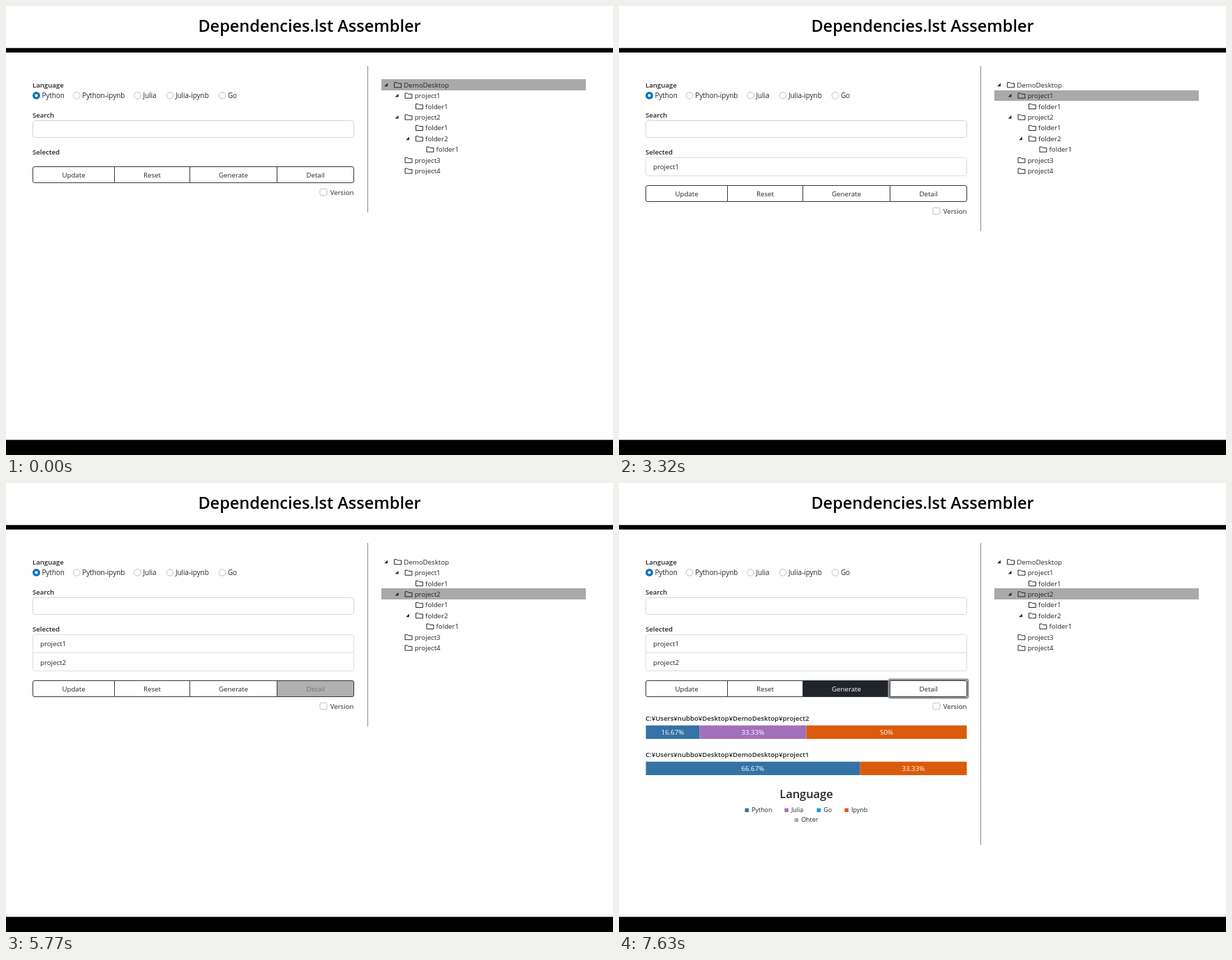
Recreate the animation shown at these times as an HTML page. Size 870x644 px, loop 8 s.

```html
<!DOCTYPE html>
<html lang="en">
<head>
<meta charset="utf-8">
<title>Dependencies.lst Assembler</title>
<style>
html, body { margin: 0; width: 100%; height: 100%; overflow: hidden; background: #fff; }
svg { display: block; width: 870px; height: 644px; }
text { font: 400 9.7px "Open Sans", "Noto Sans", sans-serif; fill: #212529; white-space: pre; }
text.label { font-weight: 600; font-size: 9.6px; }
text.title { font-weight: 600; font-size: 23.5px; fill: #000; }
text.head { font-weight: 600; font-size: 16.4px; }
text.radio { font-size: 9.9px; }
text.key { font-size: 8.9px; }
text.light { fill: #fff; }
</style>
</head>
<body>
<svg id="stage" viewBox="0 0 870 644"></svg>
<script>
const LOOP = 8000;
const NS = "http://www.w3.org/2000/svg";
const stage = document.getElementById("stage");

function add(parent, tag, attrs) {
  const el = document.createElementNS(NS, tag);
  for (const k in attrs) el.setAttribute(k, attrs[k]);
  parent.appendChild(el);
  return el;
}
function rect(parent, x, y, width, height, fill, more) {
  return add(parent, "rect", { x, y, width, height, fill, ...more });
}
function label(parent, x, y, str, cls = "", anchor = "start") {
  const el = add(parent, "text", { x, y, class: cls, "text-anchor": anchor });
  el.textContent = str;
  return el;
}
const group = parent => add(parent, "g", {});
const show = (el, on) => el.setAttribute("visibility", on ? "visible" : "hidden");

// Linear interpolation through [time, value] pairs
function track(keys, t) {
  if (!keys || t <= keys[0][0]) return keys ? keys[0][1] : 0;
  for (let i = 1; i < keys.length; i++) {
    const [t0, a] = keys[i - 1], [t1, b] = keys[i];
    if (t < t1) return a + (b - a) * (t - t0) / (t1 - t0);
  }
  return keys[keys.length - 1][1];
}
function mix(a, b, p) {
  return `rgb(${a.map((v, i) => Math.round(v + (b[i] - v) * p)).join()})`;
}
const WHITE = [255, 255, 255], DARK = [33, 37, 41], HOVER = [211, 211, 211];

// Page frame
label(stage, 435, 37, "Dependencies.lst Assembler", "title", "middle");
rect(stage, 0, 60.3, 870, 6.4, "#000");
rect(stage, 0, 622.3, 870, 21.7, "#000");
const divider = rect(stage, 518, 86, 1, 210, "#8c8c8c");

// Language choice and search
label(stage, 38, 116.7, "Language", "label");
[[43.5, "Python"], [101.3, "Python-ipynb"], [188.5, "Julia"], [235, "Julia-ipynb"], [310, "Go"]]
  .forEach(([x, name], i) => {
    const ring = i ? { r: 4.8, stroke: "#bfbfbf", "stroke-width": 1 }
                   : { r: 3.8, stroke: "#0270c0", "stroke-width": 3.2 };
    add(stage, "circle", { cx: x, cy: 128.4, fill: "#fff", ...ring });
    label(stage, x + 7.9, 132, name, "radio");
  });
label(stage, 38, 160.4, "Search", "label");
rect(stage, 38.5, 164.5, 460, 24, "#fff", { rx: 3, stroke: "#d3d6d9" });

// Selected items
label(stage, 38, 212.8, "Selected", "label");
const picked = group(stage);
const pickedBox = rect(picked, 38.5, 217.5, 460, 26, "#fff", { rx: 3, stroke: "#dedede" });
label(picked, 49, 234, "project1");
const second = group(picked);
rect(second, 38.5, 243, 460, 1, "#dedede");
label(second, 49, 260.6, "project2");

// Button row; moves down as the list grows
const actions = group(stage);
const edges = [38.5, 155.5, 263.5, 388.5, 498.5];
const TOP = 230.5, BOTTOM = 253.5;
const buttons = ["Update", "Reset", "Generate", "Detail"].map((name, i) => {
  const l = edges[i], r = edges[i + 1];
  const a = i === 0 ? 2.5 : 0, b = i === 3 ? 2.5 : 0;
  const box = add(actions, "path", {
    d: `M${l + a} ${TOP}H${r - b}q${b} 0 ${b} ${b}V${BOTTOM - b}q0 ${b} ${-b} ${b}` +
       `H${l + a}q${-a} 0 ${-a} ${-a}V${TOP + a}q0 ${-a} ${a} ${-a}z`,
    fill: "#fff", stroke: "#34383b"
  });
  return { box, text: label(actions, (l + r) / 2, 245.7, name, "", "middle") };
});
const focus = rect(actions, 386.8, 228.8, 113.4, 26.4, "none",
  { rx: 2.5, stroke: "#909294", "stroke-width": 2.6 });
rect(actions, 450, 262.2, 10, 9.6, "#fff", { rx: 2.2, stroke: "#bfbfbf" });
label(actions, 498.5, 270.7, "Version", "", "end");

// Language shares
const BLUE = "#3572a5", PURPLE = "#a270ba", ORANGE = "#da5b0b";
const detail = group(stage);
function shares(y, name, parts) {
  label(detail, 38, y, "C:¥Users¥nubbo¥Desktop¥DemoDesktop¥" + name, "label");
  let x = 38.5;
  for (const [pct, color] of parts) {
    const w = 4.6 * pct;
    rect(detail, x, y + 7.2, w, 19.3, color);
    label(detail, x + w / 2, y + 20.5, pct + "%", "light", "middle");
    x += w;
  }
}
shares(340.5, "project2", [[16.67, BLUE], [33.33, PURPLE], [50, ORANGE]]);
shares(392.5, "project1", [[66.67, BLUE], [33.33, ORANGE]]);
label(detail, 268.5, 452, "Language", "head", "middle");
[[180.5, 0, "Python", BLUE], [237.3, 0, "Julia", PURPLE], [283.5, 0, "Go", "#149bd3"],
 [323.3, 0, "Ipynb", ORANGE], [251.5, 14.2, "Ohter", "#aaaaaa"]]
  .forEach(([x, dy, name, color]) => {
    rect(detail, x, 466.5 + dy, 5.5, 5.5, color);
    label(detail, x + 9.7, 472.2 + dy, name, "key");
  });

// Folder tree: name, depth, open arrow, hover track
const rows = [
  ["DemoDesktop", 0, 1],
  ["project1", 1, 1, [[1325, 0], [1440, 1]]],
  ["folder1", 2, 0, [[1160, 0], [1250, .8], [1325, 1], [1420, 0],
                     [3805, 0], [3920, 1], [4065, 1], [4180, 0]]],
  ["project2", 1, 1, [[1080, 0], [1160, .7], [1250, 0], [4065, 0], [4180, 1]]],
  ["folder1", 2, 0, [[5035, 0], [5090, .7], [5180, .09], [5210, 0]]],
  ["folder2", 2, 1, [[5080, 0], [5160, .8], [5180, .61], [5270, 0]]],
  ["folder1", 3, 0, [[5160, 0], [5180, .16], [5230, .6], [5310, 0]]],
  ["project3", 1, 0, [[5225, 0], [5265, .4], [5330, 0]]],
  ["project4", 1, 0]
].map(([name, depth, open, hover], i) => {
  const top = Math.floor(105.6 + 15.4 * i), bottom = Math.floor(121 + 15.4 * i);
  const y = 113 + 15.42 * i, x = 15.45 * depth;
  const bg = rect(stage, 538, top, 293, bottom - top, "#fff");
  if (open) add(stage, "path", { d: `M${x + 547} ${y - 2.6}v4.8h-4.8z`, fill: "#212529" });
  add(stage, "path", {
    d: `M${x + 556.6} ${y - 3.4}h3.4l1.3 1.4h5.2v5.8h-9.9z`,
    fill: "none", stroke: "#212529", "stroke-linejoin": "round"
  });
  label(stage, x + 570.2, y + 3.7, name);
  return { bg, hover };
});

function paint(button, p) {
  button.box.setAttribute("fill", mix(WHITE, DARK, p));
  button.text.style.fill = mix(DARK, WHITE, p);
}

function draw(t) {
  const count = t < 3320 ? 0 : t < 4610 ? 1 : 2;
  const selected = [0, 1, 3][count];
  const shift = [0, 27, 53][count];
  const detailed = t >= 6290;

  rows.forEach(({ bg, hover }, i) => {
    const passed = i === 1 && count > 0;
    const fill = i === selected ? "#a9a9a9" : mix(WHITE, HOVER, passed ? 0 : track(hover, t));
    bg.setAttribute("fill", fill);
  });

  show(picked, count > 0);
  show(second, count > 1);
  pickedBox.setAttribute("height", count > 1 ? 52 : 26);
  actions.setAttribute("transform", `translate(0 ${shift})`);
  divider.setAttribute("height", detailed ? 433 : 210 + shift);
  show(detail, detailed);

  paint(buttons[2], track([[7490, 0], [7630, 1]], t));
  paint(buttons[3], track([[5720, 0], [5860, 1], [7490, 1], [7630, 0]], t));
  focus.setAttribute("opacity", track([[6080, 0], [6190, 1]], t));
}

const start = performance.now();
function tick() {
  draw((performance.now() - start) % LOOP);
  requestAnimationFrame(tick);
}
tick();
</script>
</body>
</html>
```
